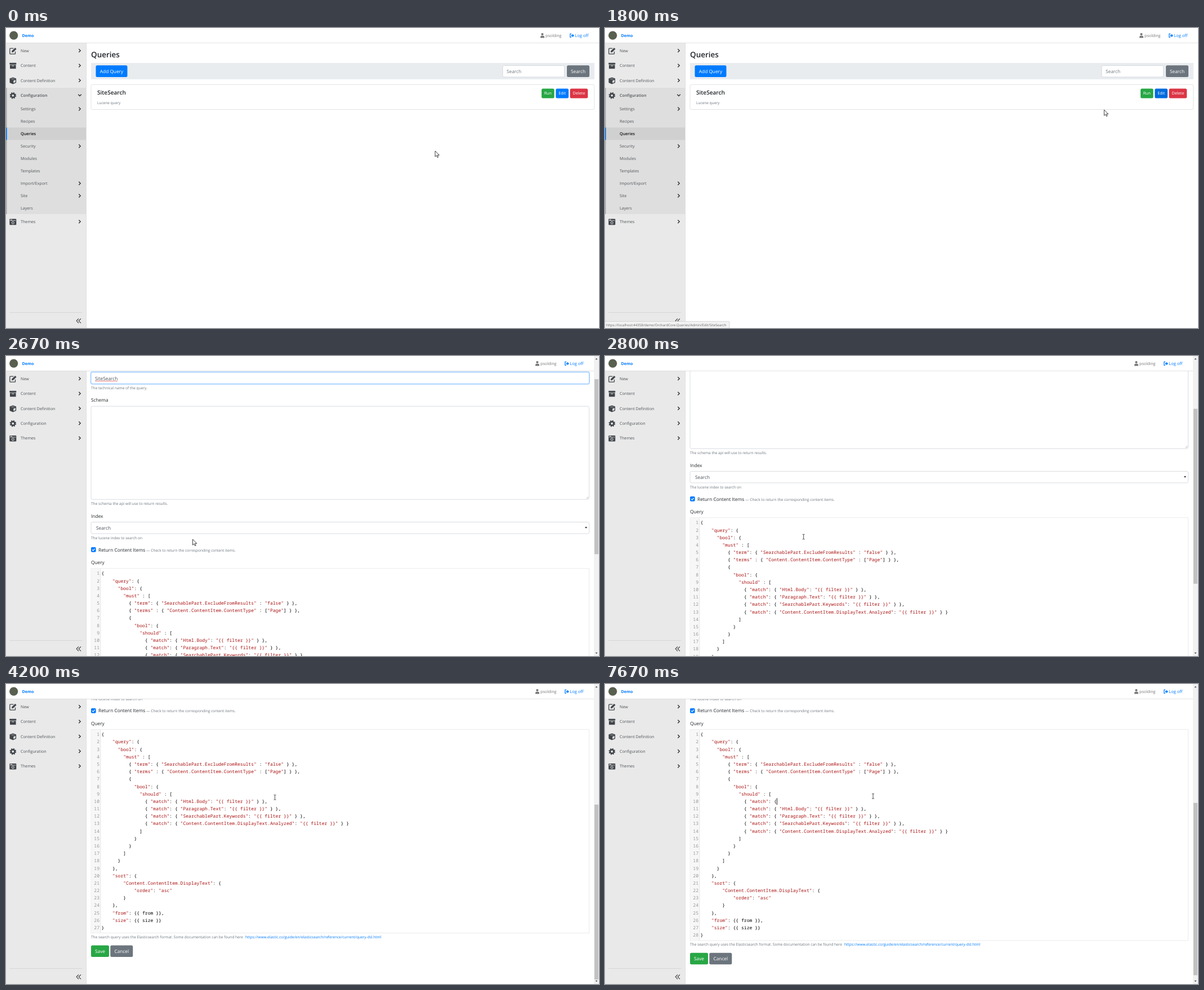
These frames come from a looping animation (1053x532 px, 8000 ms). An HTML page:

```html
<!DOCTYPE html>
<html lang="en">
<head>
<meta charset="utf-8">
<title>Edit query</title>
<style>
html, body { margin: 0; width: 100%; height: 100%; overflow: hidden; background: #fff }
svg { display: block; width: 1053px; height: 532px }
text { font-family: "Open Sans", "Noto Sans", sans-serif; white-space: pre; text-rendering: geometricPrecision }
.code { font-family: "Noto Sans Mono", "DejaVu Sans Mono", monospace; font-size: 8.05px }
</style>
</head>
<body>
<svg id="stage" viewBox="0 0 1053 532"></svg>
<script>
const LOOP = 8000, PAGE_SWAP = 1930, NEWLINE = 5600;
const LINE = 13.18, CHAR = 4.83, CODE_X = 169.6, CODE_Y = 443.6;
const BODY = 8.3, MENU = 7.18, SMALL = 6.56;
const BLUE = '#007bff', GREY = '#6c757d', INK = '#212529', SIDE = '#e9e9e9';

const text = (x, y, s, size = BODY, fill = INK, extra = '') =>
  `<text x="${x}" y="${y}" font-size="${size}" fill="${fill}" ${extra}>${s}</text>`;
const rect = (x, y, w, h, fill, extra = '') =>
  `<rect x="${x}" y="${y}" width="${w}" height="${h}" fill="${fill}" ${extra}/>`;
const path = (d, stroke, width = 1, fill = 'none', extra = '') =>
  `<path d="${d}" stroke="${stroke}" stroke-width="${width}" fill="${fill}" ${extra}/>`;
const at = (x, y, body, id = '') => `<g id="${id}" transform="translate(${x} ${y})">${body}</g>`;
const group = (id, body) => `<g id="${id}">${body}</g>`;
const field = (x, y, w, h, border = '#ced4da') => rect(x, y, w, h, '#fff', `rx="2.5" stroke="${border}" stroke-width=".8"`);
const button = (x, y, w, h, fill, label, size = BODY, id = '') =>
  rect(x, y, w, h, fill, `rx="2.5" id="${id}"`) +
  text(x + w / 2, y + h / 2 + size * .36, label, size, '#fff', 'text-anchor="middle"');

// Sidebar
const DARK = '#40454a';
const icons = {
  'New': path('M1-4.5H-4.5q-1 0-1 1V4.5q0 1 1 1H3.2q1 0 1-1V1', DARK, 1.3) + path('M-2 2.4l.4-2.6L4-5.4l2 2L.5 2z', DARK, .5, DARK),
  'Content': rect(-6, -5.2, 12, 3, DARK, 'rx=".6"') + rect(-5.3, -1.5, 10.6, 6.8, DARK, 'rx=".6"') + rect(-1.8, -.4, 3.6, 1, SIDE),
  'Content Definition': path('M0-6l5.8 2.2v7.3L0 6l-5.8-2.5v-7.3z', 'none', 0, DARK) +
    path('M-4.3-3.2L0-1.7l4.3-1.5L0-4.7z', 'none', 0, '#777') + path('M1 0l3.5-1.3v4L1 4.2z', 'none', 0, SIDE),
  'Configuration': `<g fill="none" stroke="${DARK}"><circle r="3.2" stroke-width="2.6"/>
    <circle r="4.9" stroke-width="1.9" stroke-dasharray="2.1 1.75"/></g>`,
  'Themes': rect(-6, -5.2, 12, 10.6, DARK, 'rx="1"') + rect(-5, -2.6, 10, .8, SIDE) +
    rect(-4.6, -4.2, 3, 1, SIDE) + `<circle cy="1.6" r="2" fill="none" stroke="${SIDE}"/>`
};
const chevron = (y, down) => path(down ? `M128.2 ${y - 1.5}l2.8 2.8 2.8-2.8` : `M129.3 ${y - 2.9}l2.9 2.9-2.9 2.9`, '#333', 1.4);
const menuItem = (name, y, open) => at(12.3, y + .5, icons[name]) +
  text(26, y + 2.6, name, MENU, '#50555a', open ? 'font-weight="600"' : '') + chevron(y, open);
const children = ['Settings', 'Recipes', 'Queries', 'Security', 'Modules', 'Templates', 'Import/Export', 'Site', 'Layers'];

function sidebar(open) {
  let out = rect(0, 26, 142, 506, SIDE) + rect(142, 26, .8, 506, '#d8d8d8');
  if (open) {
    out += rect(0, 106, 142, 224, '#dedede') + rect(0, 106, 1.5, 224, '#aaa') +
      rect(0, 176.5, 142, 22, '#d0d0d0') + rect(0, 176.5, 1.7, 22, BLUE);
    children.forEach((name, i) => {
      const y = 143.5 + i * 22;
      out += text(26, y + 2.6, name, MENU, i === 2 ? '#111' : '#50555a', i === 2 ? 'font-weight="600"' : '');
      if ([0, 3, 6, 7].includes(i)) out += chevron(y);
    });
  }
  Object.keys(icons).forEach((name, i) => {
    out += menuItem(name, i === 4 && open ? 343.3 : 40.2 + i * 26.35, open && i === 3);
  });
  return out + rect(6, 504, 129, .8, '#d2d2d2') + path('M129 515.3l-3.8 4 3.8 4M133 515.3l-3.8 4 3.8 4', '#444', 1.2);
}

const topBar = width => rect(0, 0, width, 26.2, '#fff') + rect(0, 26, width, .8, '#dcdcdc') +
  '<circle cx="13.7" cy="13.2" r="7.6" fill="#59604f"/>' +
  text(28.5, 16, 'Demo', MENU, BLUE, 'font-weight="700"') +
  at(width - 1053, 0,
    `<circle cx="952.4" cy="11" r="2.1" fill="#777"/>` + path('M949 17.5v-1.6q0-2.2 2.2-2.2h2.6q2.2 0 2.2 2.2v1.6z', 'none', 0, '#777') +
    text(958, 16.1, 'psolding', MENU, '#777') +
    path('M1004 10.4h-2.3v6h2.3', BLUE, 1.1) + path('M1003.4 12.4h2.3v-2.2l3.2 3.2-3.2 3.2v-2.2h-2.3z', 'none', 0, BLUE) +
    text(1010.3, 16.4, 'Log off', 7.5, BLUE));

const heading = s => text(151, 51.8, s, 13.5, INK, 'font-weight="600"');

const listPage = heading('Queries') +
  rect(151, 62, 894, 29, '#e9ecef') + button(159.5, 66.3, 56, 20.6, BLUE, 'Add Query') +
  field(882, 66.5, 109.5, 20.4) + text(889, 79.8, 'Search', BODY, GREY) + button(996, 66.3, 40, 20.6, GREY, 'Search') +
  field(151, 100.3, 893.6, 44.2, '#dcdcdc') +
  text(162, 118, 'SiteSearch', 10.1, INK, 'font-weight="600"') + text(162, 134.6, 'Lucene query', SMALL, GREY) +
  button(951, 107.4, 22.6, 17, '#28a745', 'Run', MENU) +
  button(976.3, 107.4, 22.7, 17, BLUE, 'Edit', MENU, 'edit') +
  button(1001.5, 107.4, 31.7, 17, '#dc3545', 'Delete', MENU);

// Editor
const source = `{
    "query": {
      "bool": {
        "must" : [
          { "term": { "SearchablePart.ExcludeFromResults" : "false" } },
          { "terms" : { "Content.ContentItem.ContentType" : ["Page"] } },
          {
            "bool": {
              "should" : [
                { "match": { "Html.Body": "{{ filter }}" } },
                { "match": { "Paragraph.Text": "{{ filter }}" } },
                { "match": { "SearchablePart.Keywords": "{{ filter }}" } },
                { "match": { "Content.ContentItem.DisplayText.Analyzed": "{{ filter }}" } }
              ]
            }
          }
        ]
      }
    },
    "sort": {
        "Content.ContentItem.DisplayText": {
            "order": "asc"
        }
    },
    "from": {{ from }},
    "size": {{ size }}
}`.split('\n');
const highlight = s => s.replace(/"[^"]*"?/g, m => `<tspan fill="#a11">${m}</tspan>`);
const lineY = i => CODE_Y + i * LINE;
const codeLine = (s, i) => `<text class="code" x="${CODE_X}" y="${lineY(i)}">${highlight(s)}</text>`;
const lineNumber = i => `<text class="code" x="166" y="${lineY(i)}" fill="#999" text-anchor="end" id="num${i + 1}">${i + 1}</text>`;

const editor = rect(151, 432, 884.5, 361, '#fff', 'id="editor" stroke="#e6e6e6" stroke-width=".8"') +
  rect(151.4, 432.4, 16.6, 360.2, '#f7f7f7', 'id="gutter"') + rect(167.6, 432.4, .7, 360.2, '#ddd', 'id="gutterLine"') +
  [...Array(28).keys()].map(lineNumber).join('') +
  source.slice(0, 9).map(codeLine).join('') +
  `<text class="code" id="typed" x="${CODE_X + 16 * CHAR}" y="${lineY(9)}"></text>` +
  group('below', source.slice(9).map((s, i) => codeLine(s, i + 9)).join('') +
    text(151, 802.4, 'The search query uses the Elasticsearch format. Some documentation can be found here', SMALL, GREY) +
    text(425, 802.4, 'https://www.elastic.co/guide/en/elasticsearch/reference/current/query-dsl.html', SMALL, BLUE) +
    button(151, 814.8, 32, 20.6, '#28a745', 'Save') + button(185.3, 814.8, 40, 20.6, GREY, 'Cancel')) +
  rect(0, 0, .9, 12, '#000', 'id="caret"');

const help = (y, s, x = 151) => text(x, y, s, SMALL, GREY);
const editPage = heading("Edit 'SiteSearch' query") +
  text(151, 75.9, 'Name') +
  rect(151, 84, 884.5, 20.5, '#fff', 'rx="2.5" stroke="#bfdeff" stroke-width="3"') + field(151, 84, 884.5, 20.5, '#80bdff') +
  text(158, 97.8, 'SiteSearch', BODY, '#495057') + rect(158, 99.2, 40, .7, '#e04a4a') + rect(157.8, 88.5, .8, 12, '#000', 'id="nameCaret"') +
  help(114.3, 'The technical name of the query.') +
  text(151, 136.2, 'Schema') + field(151, 144.3, 884.5, 165.2) + path('M1030.8 308l3.4-3.4M1032.8 308l1.4-1.4', '#888', .6) +
  help(319.5, 'The schema the api will use to return results.') +
  text(151, 341.8, 'Index') + field(151, 349.7, 884.5, 20.5) + text(160, 363.4, 'Search', BODY, '#495057') +
  path('M1028 358.2h4l-2 3z', 'none', 0, '#333') +
  help(380, 'The lucene index to search on') +
  rect(151, 394.3, 8.7, 8.7, BLUE, 'rx="1.8"') + path('M153 398.7l1.7 1.7 3.1-3.4', '#fff', 1.1) +
  text(164, 401.8, 'Return Content Items') + help(401.8, '— Check to return the corresponding content items.', 249) +
  text(151, 424, 'Query') + editor;

const scrollbar = rect(1044, 0, 9, 532, '#f1f1f1') + rect(1045, 9, 7, 310, '#c1c1c1', 'id="thumb"') +
  path('M1046.5 6.2h4l-2-2.4z', 'none', 0, '#505050') + path('M1046.5 525.8h4l-2 2.4z', 'none', 0, '#505050');

const pointers = {
  arrow: path('M0 0v10.2l2.4-2.2 1.6 3.6 1.7-.7-1.6-3.5h3.2z', '#111', .8, '#fff'),
  hand: path('M-1 1a1 1 0 0 1 2 0v3.5l4 .9q1.3.4 1.2 1.8l-.6 4.6h-5.8l-3.2-4.2q-.3-1.2 .9-1.2l1.5 1.2z', '#111', .8, '#fff'),
  beam: path('M-2-4.3h1.4l.6.5.6-.5H2M0-4v8M-2 4.3h1.4l.6-.5.6.5H2', '#222', .8)
};

document.getElementById('stage').innerHTML = rect(0, 0, 1053, 532, '#fff') +
  group('list', listPage + sidebar(true) + topBar(1053)) +
  group('form', group('content', editPage) + sidebar(false) + topBar(1044) + scrollbar) +
  group('status', rect(-1, 520.3, 222, 13, '#f3f3f3', 'stroke="#c8c8c8" stroke-width=".7" rx="1"') +
    text(2, 528.6, 'https://localhost:44358/demo/OrchardCore.Queries/Admin/Edit/SiteSearch', 6.14, '#666')) +
  group('pointer', Object.entries(pointers).map(([id, shape]) => group(id, shape)).join(''));

// Motion
const pointerKeys = [[70, 762, 218], [270, 792, 240], [400, 830, 247], [600, 910, 212], [870, 989, 120], [1270, 988.5, 117.5],
  [1560, 988.5, 117.5], [1750, 960, 132], [1930, 700, 178], [2130, 404.5, 193], [2330, 352, 275], [2530, 331.5, 325], [2700, 331.5, 325],
  [2860, 365, 318], [3070, 392, 308], [3200, 411, 317], [3270, 412, 316], [3500, 470, 268], [3700, 508, 225], [3850, 500, 200],
  [4070, 479, 203], [4330, 476, 199]];
const scrollKeys = [[2530, 0], [2670, 54.5], [3070, 331.5], [3200, 351.3]];
const keystrokes = [5930, 6070, 6330, 6470, 6530, 6730, 6870, 7000, 7130, 7330, 7470, 7670];
const typing = '{ "match": {';

const clamp = v => Math.max(0, Math.min(1, v));
function track(keys, t) {
  const next = keys.findIndex(k => k[0] > t);
  if (next === 0) return keys[0].slice(1);
  if (next < 0) return keys[keys.length - 1].slice(1);
  const a = keys[next - 1], b = keys[next], p = (t - a[0]) / (b[0] - a[0]);
  return a.slice(1).map((v, i) => v + (b[i + 1] - v) * p);
}
const $ = id => document.getElementById(id);
const set = (id, attrs) => { for (const k in attrs) $(id).setAttribute(k, attrs[k]); };
const show = (id, on) => { $(id).style.display = on ? '' : 'none'; };

function pointerShape(t, x, y) {
  if (t < PAGE_SWAP) return t >= 900 && t < 1750 ? 'hand' : 'arrow';
  const inField = x > 151 && x < 1035 && ((y > 84 && y < 105) || (y > 144 && y < 310) || (y > 432 && y < 793));
  return inField ? 'beam' : 'arrow';
}

function draw(t) {
  const [x, y] = track(pointerKeys, t), [scroll] = track(scrollKeys, t);
  const editing = t >= PAGE_SWAP, extra = t >= NEWLINE ? LINE : 0;

  show('list', !editing);
  show('form', editing);
  const hover = clamp((t - 900) / 150) * clamp((1900 - t) / 150);
  set('edit', { fill: `rgb(0 ${123 - 25 * hover} ${255 - 51 * hover})` });
  set('status', { opacity: clamp((t - 1000) / 130) * clamp((2150 - t) / 120) });

  set('content', { transform: `translate(0 ${-scroll})` });
  const ratio = 516 / (885 + extra);
  set('thumb', { y: 9 + scroll * ratio, height: 532 * ratio });
  set('below', { transform: `translate(0 ${extra})` });
  set('editor', { height: 361 + extra });
  set('gutter', { height: 360.2 + extra });
  set('gutterLine', { height: 360.2 + extra });
  show('num28', extra);

  const count = keystrokes.filter(k => t >= k).length;
  $('typed').innerHTML = highlight(typing.slice(0, count));
  show('nameCaret', t < PAGE_SWAP + 530);
  show('caret', (t >= 4600 && t < 5130) || extra);
  set('caret', extra ? { x: CODE_X + (16 + count) * CHAR, y: lineY(9) - 8.6 } : { x: CODE_X + 26 * CHAR, y: lineY(8) - 8.6 });

  const shape = pointerShape(t, x, y + scroll);
  Object.keys(pointers).forEach(id => show(id, id === shape));
  set('pointer', { transform: `translate(${x} ${y})` });
}

(function frame() {
  draw(performance.now() % LOOP);
  requestAnimationFrame(frame);
})();
</script>
</body>
</html>
```
